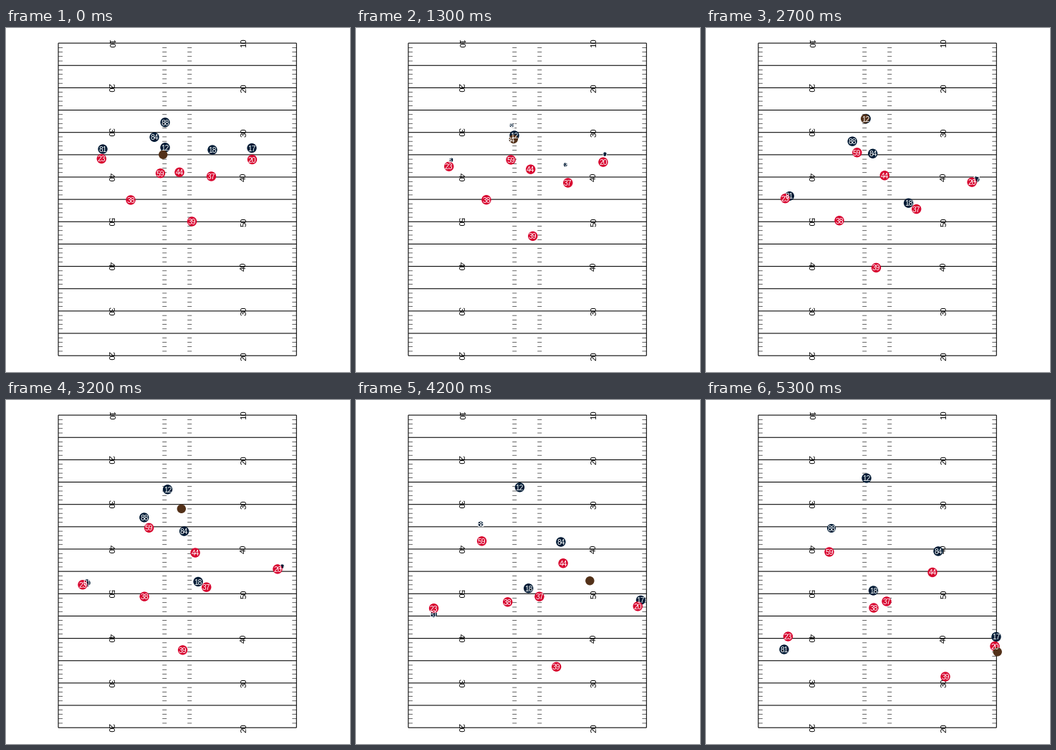
Animation, 480 px wide and 480 px high, one loop 5400 ms. Source, as a matplotlib script:

```python
import numpy as np
import matplotlib.pyplot as plt
from matplotlib.animation import FuncAnimation

SIZE, FRAMES, STEP_MS = 480, 54, 100
END = (FRAMES - 1) * STEP_MS / 1000
NAVY, RED, BROWN = "#011b35", "#d8052f", "#533119"
LEFT, RIGHT, TOP, YARD = 73, 405.3, 21.1, 6.23
DOT_R, BALL_R = 6.7, 6.2

# Seconds: snap to the quarterback, release, tightest coverage
SNAP, SNAP_TIME, RELEASE, TIGHT = 0.65, 0.8, 2.95, 3.0
SPOT, CATCH = np.array([219.2, 176.7]), np.array([406.7, 351.4])

# Waypoints, evenly spaced in time
ROUTES = {
    88: [(222, 131.7), (217, 136), (205, 157.5), (176, 171), (175, 179)],
    84: [(207, 152.3), (216.5, 156), (231.5, 174.5), (278, 195), (324, 211)],
    12: [(222, 166.7), (221, 149.5), (223, 127), (228.5, 123.5), (224, 109)],
    81: [(135, 169), (133, 184.5), (117, 232.5), (109, 289), (109, 348)],
    18: [(288, 170), (292, 191.5), (283.5, 243), (244.5, 261), (233.5, 266)],
    17: [(343, 167.5), (347.5, 176.5), (376.5, 209.5), (395, 269), (405, 330.5)],
}
ZONES = {
    38: [(174, 240), (182, 240), (185.5, 268), (207.5, 280), (234, 290)],
    39: [(259.5, 270), (246.5, 291), (237, 333), (271, 368), (334, 386)],
}
# defender: receiver, then the gap at the start, when tightest and at the end
COVERAGE = {
    23: (81, (-1.7, 13.5), (-6, 3), (5.5, -18)),
    59: (88, (-6.5, 71), (7, 14), (-3, 33)),
    44: (84, (35, 49), (16, 30), (-8, 29.5)),
    37: (18, (-1.5, 37), (11.5, 7.5), (18.5, 15)),
    20: (17, (0.5, 16), (-6.5, 3.5), (-2, 13)),
}
# Moments at which a dot shrinks
DIPS = {88: (1.25, 4.5), 84: (1.25,), 81: (1.25, 3.75), 18: (1.35,), 17: (1.25, 3.1)}


def ease(u):
    u = np.clip(u, 0, 1)
    return u * u * (3 - 2 * u)


def route(points, t):
    """Smooth curve through evenly timed waypoints."""
    p = np.array(points, float)
    slope = np.gradient(p, axis=0, edge_order=2)
    pos = t / END * (len(p) - 1)
    i = min(int(pos), len(p) - 2)
    u = pos - i
    w = ease(u)
    return ((1 - w) * p[i] + w * p[i + 1]
            + u * (1 - u) * ((1 - u) * slope[i] - u * slope[i + 1]))


def cover(man, start, tight, end, t):
    """Shadow a receiver: close the gap, then let it drift."""
    start, tight, end = map(np.array, (start, tight, end))
    gap = start + (tight - start) * ease(t / TIGHT)
    gap = gap + (end - tight) * ease((t - TIGHT) / (END - TIGHT))
    return route(ROUTES[man], t) + gap


def ball(t):
    passer = route(ROUTES[12], min(t, RELEASE)) - (1, 0)
    if t < RELEASE:
        return SPOT + (passer - SPOT) * np.clip((t - SNAP) / SNAP_TIME, 0, 1)
    u = (t - RELEASE) / (END - RELEASE)
    return passer + (CATCH - passer) * (u + 0.12 * u * (1 - u))


def radius(number, t):
    return DOT_R - sum(4 * np.exp(-((t - c) / 0.6) ** 2) for c in DIPS.get(number, ()))


def draw_field(ax):
    style = dict(color="black", zorder=2, snap=False)
    ax.hlines(TOP + 5 * YARD * np.arange(15), LEFT, RIGHT, lw=1.07, **style)
    ax.vlines([LEFT, RIGHT], TOP, TOP + 70 * YARD, lw=1.07, **style)
    hashes = [TOP + YARD * k for k in range(70) if k % 5]
    for x in (LEFT, 218.2, 253.2, RIGHT - 6):
        ax.hlines(hashes, x, x + 6, lw=0.6, **style)
    for k in range(8):
        yards = 50 - 10 * abs(4 - k)
        y = TOP + 10 * YARD * k
        for x, angle in ((145.6, 270), (332.2, 90)):
            ax.text(x, y, str(yards), rotation=angle, fontsize=11.2,
                    ha="center", va="center", zorder=1)


plt.rcParams["font.family"] = "Liberation Sans"
fig = plt.figure(figsize=(SIZE / 72, SIZE / 72), dpi=72, facecolor="white")
ax = fig.add_axes([0, 0, 1, 1])
ax.set(xlim=(0, SIZE), ylim=(SIZE, 0))
ax.axis("off")
draw_field(ax)

numbers = [*ROUTES, *ZONES, *COVERAGE]
colors = [NAVY if n in ROUTES else RED for n in numbers] + [BROWN]
dots = ax.scatter(np.zeros(len(colors)), np.zeros(len(colors)),
                  s=np.ones(len(colors)), c=colors, linewidths=0, zorder=3)
labels = [ax.text(0, 0, str(n), color="white", fontsize=10.3,
                  ha="center", va="center", zorder=4) for n in numbers]


def update(frame):
    t = frame * STEP_MS / 1000
    spots = [route(p, t) for p in (*ROUTES.values(), *ZONES.values())]
    spots += [cover(*c, t) for c in COVERAGE.values()]
    for label, (x, y) in zip(labels, spots):
        label.set_position((x, y + 1))
    radii = [radius(n, t) for n in numbers] + [BALL_R]
    dots.set_offsets(spots + [ball(t)])
    dots.set_sizes((2 * np.array(radii)) ** 2)
    return [dots, *labels]


anim = FuncAnimation(fig, update, frames=FRAMES, interval=STEP_MS, repeat=True, repeat_delay=0)
plt.show()
```
